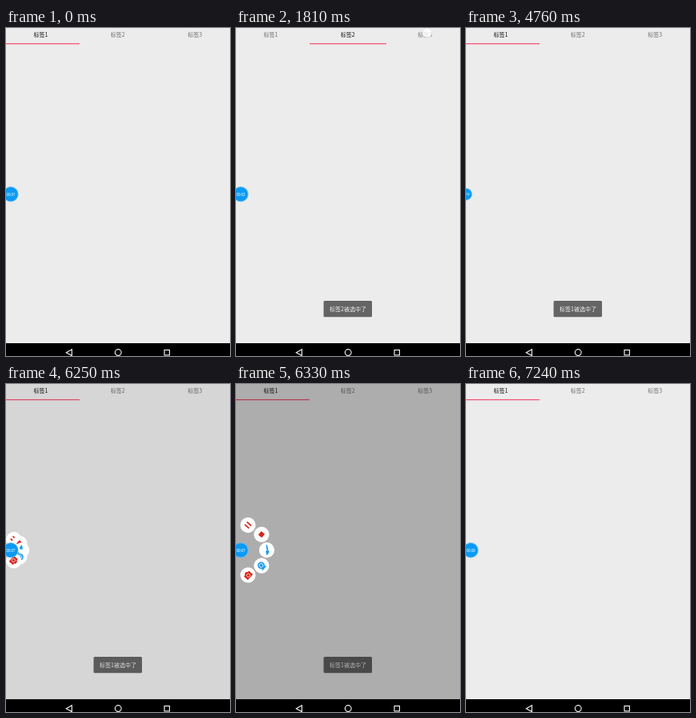
An HTML page for the animation above (9710 ms loop, 280x410 px).

```html
<!DOCTYPE html>
<html lang="zh">
<head>
<meta charset="utf-8">
<style>
html, body { margin: 0; width: 100%; height: 100%; overflow: hidden; background: #ececec; }
svg { display: block; width: 280px; height: 410px; }
text { font: 7px "Noto Sans CJK SC", "Noto Sans CJK", sans-serif; text-anchor: middle; }
#ball text { font: 4.5px Roboto, sans-serif; fill: #fff; }
.toast rect { fill: #646464; }
.toast text { fill: #f2f2f2; }
.red { fill: #d8261c; }
.blue { fill: #1a9bee; }
</style>
</head>
<body>
<svg viewBox="0 0 280 410">
  <rect width="280" height="410" fill="#ececec"/>
  <g id="tabs"></g>
  <rect id="bar" y="19" width="96" height="1.3" fill="#f4577c"/>
  <g id="toasts"></g>
  <rect id="shade" width="280" height="394"/>
  <rect y="394" width="280" height="16"/>
  <g fill="none" stroke="#eee" stroke-width="1.2">
    <path d="M82.3 401.8V409.6L75.3 405.7Z"/>
    <circle cx="140.2" cy="405.6" r="3.9"/>
    <rect x="198" y="402.5" width="6.4" height="6.4"/>
  </g>
  <g id="menu">
    <g><circle r="9.6" fill="#fff"/><path class="red" d="M-2.9-3.6h1.7v7.2h-1.7zM1.2-3.6h1.7v7.2H1.2z"/></g>
    <g><circle r="9.6" fill="#fff"/><rect class="red" x="-2.9" y="-2.9" width="5.8" height="5.8" rx=".5"/></g>
    <g><circle r="9.6" fill="#fff"/><path class="blue" d="M4.2-5L5.2-4 1.6 1 .2-.4ZM-.4-.2L1.4 1.6C1 4.2-2 5-5.2 4.2-3.4 3.4-3.8.4-.4-.2Z"/></g>
    <g><circle r="9.6" fill="#fff"/><circle class="blue" cy="-.6" r="4.4"/><path class="blue" d="M-4 4.9L-2.4 2.8H2.4L4 4.9Z"/><circle cy="-.6" r="2.4" fill="none" stroke="#fff" stroke-width=".8"/></g>
    <g><circle r="9.6" fill="#fff"/><path class="red" d="M-4.7-2.6H-2.4L-1.6-4.2H1.6L2.4-2.6H4.7V4H-4.7Z"/><circle cy=".6" r="2.1" fill="none" stroke="#fff" stroke-width=".7"/></g>
  </g>
  <g id="ball">
    <circle r="9.2" fill="#0b9af5" stroke="#72c3f3" stroke-width=".8"/>
    <text y="1.7"></text>
  </g>
  <circle id="dot" r="6" fill="#fff" fill-opacity=".8" stroke="#999" stroke-opacity=".3" stroke-width=".6"/>
</svg>
<script>
const LOOP = 9710, RESET = 7240;
const $ = id => document.getElementById(id);
const ramp = (t, a, b) => Math.min(1, Math.max(0, (t - a) / (b - a)));
const smooth = x => x * x * (3 - 2 * x);
const overshoot = x => (x - 1) ** 2 * (2.5 * (x - 1) + 1.5) + 1;
const set = (el, name, value) => el.setAttribute(name, value);

const taps = [[390, 143, 7], [1810, 239, 6], [3840, 46, 7], [6050, 8, 208], [7160, 40, 185]];
const ticks = [880, 1870, 2850, 3840, 4720, 5710, 6680];
const toasts = [[2, 620, 880], [3, 2460, 2900], [1, 4340, 4760]];

for (const n of [1, 2, 3]) {
  $('tabs').innerHTML += `<text x="${43.5 + 96.3 * (n - 1)}" y="11.4">标签${n}</text>`;
}
for (const [n] of toasts) {
  $('toasts').innerHTML += `<g class="toast"><rect x="109.5" y="341" width="60.5" height="20.3" rx="1.5"/>
    <text x="140" y="353.6">标签${n}被选中了</text></g>`;
}
const labels = [...$('tabs').children];
const toastEls = [...$('toasts').children];
const items = [...$('menu').children];
const clock = $('ball').querySelector('text');

function draw(t) {
  const done = t >= RESET;

  const slide = start => smooth(ramp(t, start, start + 280));
  set($('bar'), 'x', -4 + 96 * (slide(470) + slide(1890) - 2 * slide(3920)));
  const tab = t < 470 || t >= 3920 ? 0 : t < 1890 ? 1 : 2;
  labels.forEach((el, i) => set(el, 'fill', i === tab ? '#161616' : '#707070'));

  // A new toast fades in over the previous one; only the last fades out.
  toasts.forEach(([, a, b], i) => {
    const next = toasts[i + 1];
    const out = next ? +(t >= next[2]) : ramp(t, 6420, 6660);
    set(toastEls[i], 'opacity', ramp(t, a, b) * (1 - out));
  });

  set($('shade'), 'opacity', done ? 0 : 0.39 * ramp(t, 6206, 6390));
  const open = overshoot(ramp(t, 6214, 6614));
  set($('menu'), 'visibility', t > 6214 && !done ? 'visible' : 'hidden');
  items.forEach((el, i) => {
    const a = (i - 2) * 37 * Math.PI / 180, r = 37.5 * open;
    set(el, 'transform', `translate(${6 + r * Math.cos(a)} ${207.6 + r * Math.sin(a)}) rotate(${360 * (open - 1)})`);
  });

  const hidden = t < 3330 ? 0 : 1 - ramp(t, 6090, 6170);
  set($('ball'), 'transform', `translate(${6 - 6 * hidden} 207.8) scale(${1 - 0.2 * hidden})`);
  const seconds = done ? 0 : 1 + ticks.filter(s => t >= s).length;
  clock.textContent = '00:0' + seconds;

  const tap = taps.find(([s]) => t >= s && t < s + 80);
  set($('dot'), 'visibility', tap ? 'visible' : 'hidden');
  if (tap) set($('dot'), 'transform', `translate(${tap[1]} ${tap[2]})`);
}

const begin = performance.now();
function frame() {
  draw((performance.now() - begin) % LOOP);
  requestAnimationFrame(frame);
}
frame();
</script>
</body>
</html>
```
